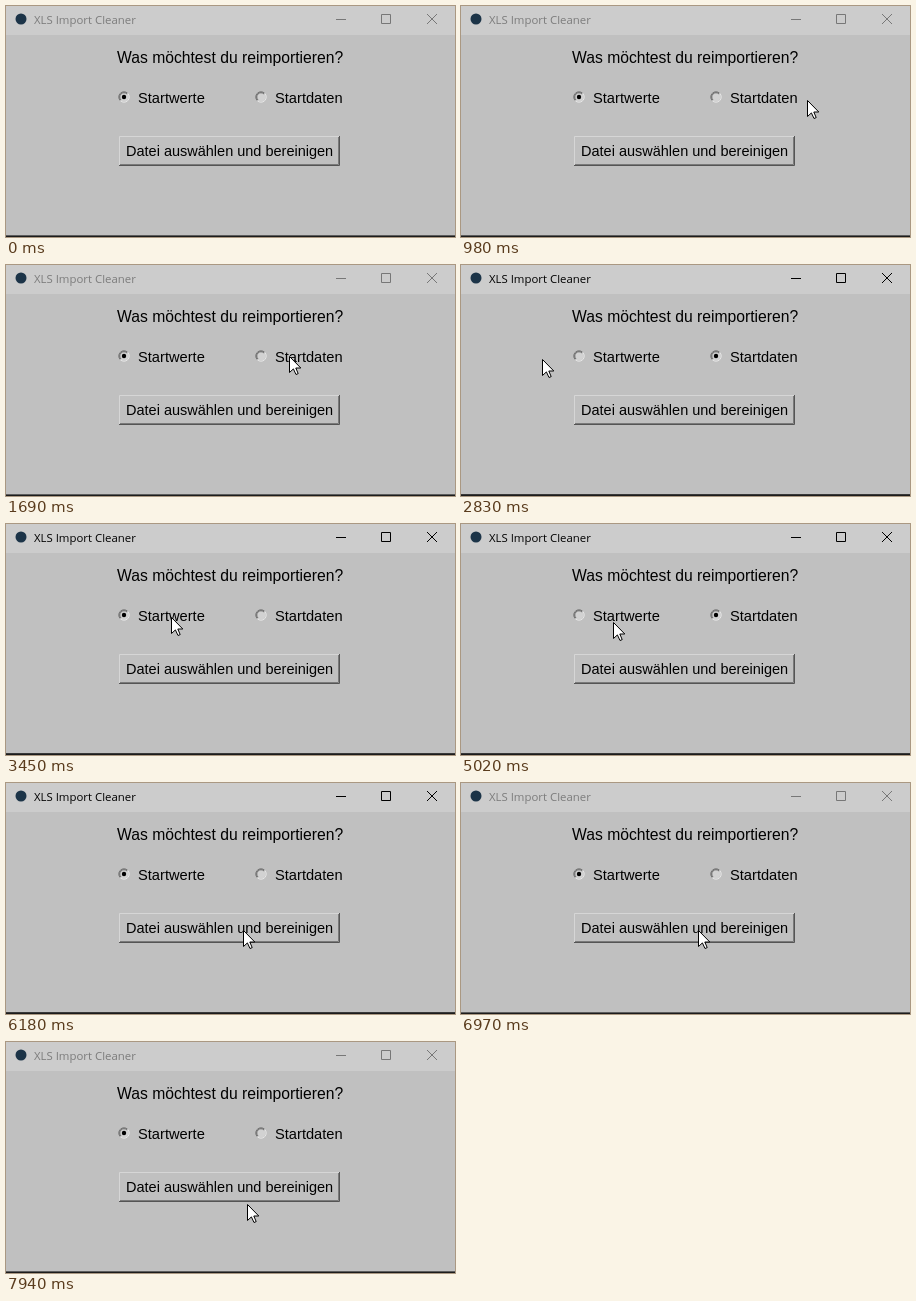
An HTML page that plays this animation: 449x231 px, repeating every 8000 ms.

```html
<!DOCTYPE html>
<html lang="de">
<head>
<meta charset="utf-8">
<title>XLS Import Cleaner</title>
<style>
  html, body { margin: 0; width: 100%; height: 100%; overflow: hidden; background: #c0c0c0; }
  svg { display: block; width: 449px; height: 231px; }
  text { font: 14.67px "Liberation Sans", Arial, sans-serif; fill: #000; }
  #title { font: 11.4px "Open Sans", "Noto Sans", sans-serif; }
  #heading { font-size: 15.7px; }
  #label { font-size: 14.5px; }
</style>
</head>
<body>
<svg viewBox="0 0 449 231">
  <defs>
    <g id="radio" fill="none">
      <circle r="4.5" fill="#d2d2d2"/>
      <path d="M-3.7 3.7A5.2 5.2 0 0 1 3.7-3.7" stroke="#747474"/>
      <path d="M-3 3A4.2 4.2 0 0 1 3-3" stroke="#505050" stroke-width=".8"/>
      <path d="M-3.7 3.7A5.2 5.2 0 0 0 3.7-3.7" stroke="#e6e6e6"/>
    </g>
  </defs>

  <rect width="449" height="231" fill="#c0c0c0"/>
  <rect width="449" height="29" fill="#ccc"/>
  <circle cx="15" cy="13" r="5.5" fill="#1c3448"/>
  <text id="title" x="28" y="18">XLS Import Cleaner</text>
  <path id="controls" d="M330 13.5h10M375.5 8.5h9v9h-9zM421 8l10 10M431 8l-10 10" fill="none"/>

  <text id="heading" x="111" y="57">Was möchtest du reimportieren?</text>
  <use href="#radio" x="118" y="91"/>
  <use href="#radio" x="255" y="91"/>
  <circle id="dot" cy="91" r="2.2"/>
  <text x="132" y="97">Startwerte</text>
  <text x="269" y="97">Startdaten</text>

  <g fill="none">
    <path id="edgeLight" d="M113.5 159V130.5H333"/>
    <path id="edgeDark" d="M113 159.5H333.5V130"/>
    <path id="edgeInner" d="M114 158.5H332.5V131"/>
  </g>
  <text id="label" x="120" y="150">Datei auswählen und bereinigen</text>

  <rect id="border" y="229" width="449" height="1"/>
  <rect y="230" width="449" height="1" fill="#1c1c1c"/>

  <g id="pointer">
    <path d="M.5.5V16.5L4.4 12.9 7 18.5 9.2 17.6 6.8 12H11.8Z" fill="#fff" stroke="#000"/>
    <circle id="press" r="12" fill="#ff0" fill-opacity=".47"/>
  </g>
</svg>

<script>
const LOOP = 8000, STEP = 68, HOLD = 140;
const $ = id => document.getElementById(id);

// Each move eases to (x, y); bow is how far its middle dips down.
const START = { x: 334, y: 231 };
const MOVES = [
  { from: 240, to: 650, x: 350, y: 108 },
  { from: 980, to: 1360, x: 279, y: 94, bow: -26 },
  { from: 1510, to: 1690, x: 283, y: 91 },
  { from: 2430, to: 2630, x: 51, y: 104, bow: 8 },
  { from: 2770, to: 3110, x: 165, y: 93, bow: -8 },
  { from: 3700, to: 4120, x: 288, y: 93, bow: 6 },
  { from: 4580, to: 5020, x: 152, y: 98, bow: 9 },
  { from: 5220, to: 5360, x: 149, y: 88 },
  { from: 5840, to: 6180, x: 237, y: 147 },
  { from: 7550, to: 7690, x: 241, y: 162 }
];
// The first presses toggle the radio buttons, the last one hits the button.
const TOGGLES = [1890, 3300, 4240, 5560];
const SUBMIT = 6420;
const ACTIVE = { from: TOGGLES[0], to: 6970 };

const within = (t, from, to) => t >= from && t < to;
const smooth = u => u * u * (3 - 2 * u);

// The pointer is sampled in steps, as in a screen recording.
function progress(t, { from, to }) {
  const steps = Math.round((to - from) / STEP) + 1;
  return t >= to ? 1 : Math.min(1, (Math.floor((t - from) / STEP + .25) + 1) / steps);
}

function pointerAt(t) {
  let { x, y } = START;
  for (const move of MOVES) {
    if (t < move.from) break;
    const u = progress(t, move);
    x += (move.x - x) * smooth(u);
    y += (move.y - y) * smooth(u) + (move.bow || 0) * 4 * u * (1 - u);
  }
  return [Math.round(x), Math.round(y)];
}

function render(t) {
  $("pointer").setAttribute("transform", `translate(${pointerAt(t)})`);
  $("pointer").style.display = t < MOVES[0].from ? "none" : "";
  const pressed = [...TOGGLES, SUBMIT].some(c => within(t, c, c + HOLD));
  $("press").style.display = pressed ? "" : "none";

  const active = within(t, ACTIVE.from, ACTIVE.to);
  $("title").style.fill = active ? "#000" : "#7c7c7c";
  $("controls").style.stroke = active ? "#000" : "#777";
  $("border").style.fill = active ? "#383838" : "#5c5c5c";

  const toggled = TOGGLES.filter(c => t >= c + HOLD).length % 2;
  $("dot").setAttribute("cx", toggled ? 255 : 118);

  const sunken = within(t, SUBMIT, SUBMIT + 1.5 * HOLD);
  $("edgeLight").style.stroke = sunken ? "#555" : "#d6d6d6";
  $("edgeDark").style.stroke = sunken ? "#d6d6d6" : "#555";
  $("edgeInner").style.stroke = sunken ? "#c8c8c8" : "#7a7a7a";
  $("label").setAttribute("transform", `translate(${sunken ? "1 1" : "0 0"})`);
}

const begin = performance.now();
function tick() {
  render((performance.now() - begin) % LOOP);
  requestAnimationFrame(tick);
}
tick();
</script>
</body>
</html>
```
